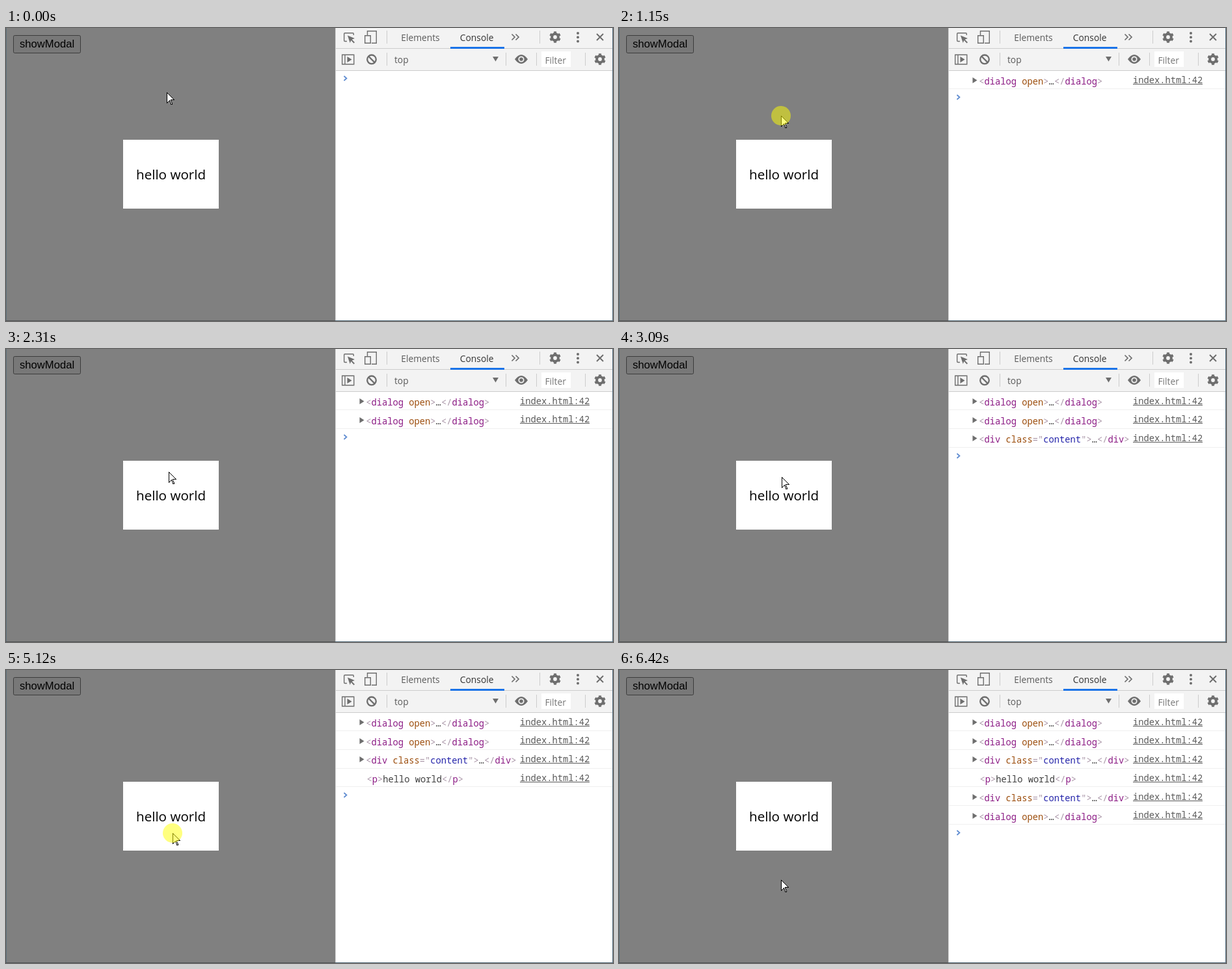
An HTML page that plays this animation: 933 by 451 pixels, repeating every 6.73 s.

```html
<!DOCTYPE html>
<html lang="en">
<head>
<meta charset="utf-8">
<title>Modal click log</title>
<style>
  html, body { margin: 0; width: 100%; height: 100%; overflow: hidden; background: #fff; }
  svg { display: block; }
  text { white-space: pre; }
  .ui { font: 13.8px "Open Sans", "Noto Sans", sans-serif; fill: #5a5a5a; }
  .code { font: 13.75px "Noto Sans Mono", "Liberation Mono", monospace; fill: #404040; }
  .mark { fill: #a894a6; }
  .tag { fill: #8b1a84; }
  .attr { fill: #9c4d0c; }
  .value { fill: #2424aa; }
  .link { fill: #5a5a5a; }
  .line { fill: none; stroke: #6e6e6e; stroke-width: 1.4; }
  .solid { fill: #6e6e6e; }
  .sep { stroke: #ccc; }
</style>
</head>
<body>
<svg width="933" height="451" viewBox="0 0 933 451">
  <defs>
    <g id="gear" fill="none" stroke="#6e6e6e">
      <circle r="4.9" stroke-width="4"/>
      <circle r="7.5" stroke-width="2.6" pathLength="12" stroke-dasharray="1 1" stroke-dashoffset="-.5"/>
    </g>
  </defs>

  <!-- page -->
  <rect width="506" height="451" fill="#808080"/>
  <rect x="11.5" y="11.5" width="103" height="27" rx="2" fill="#787878" stroke="#3b3b3b"/>
  <text x="63" y="30" text-anchor="middle" font-size="16.67" font-family="Liberation Sans, Arial, sans-serif">showModal</text>
  <rect x="180" y="172" width="147" height="106" fill="#fff"/>
  <text x="200" y="233" font-size="20.6" font-family="Open Sans, Noto Sans, sans-serif">hello world</text>

  <!-- developer tools -->
  <rect x="507" width="426" height="66" fill="#f3f3f3"/>
  <path d="M507 31.5H933M507 65.5H933" stroke="#ccc"/>
  <path d="M506.5 0V451" stroke="#cdcdcd"/>
  <rect x="683" y="29" width="83" height="3" fill="#1a73e8"/>
  <path class="sep" d="M585.5 4V24M820.5 4V24M585.5 38V58M768.5 38V58M815.5 38V58M890.5 38V58"/>

  <path class="line" d="M524 20.5H521Q519.7 20.5 519.7 19V9Q519.7 7.7 521 7.7H533Q534.3 7.7 534.3 9V11"/>
  <path class="solid" d="M525 11.5L536 16 531.7 17.7 536 22 534.6 23.4 530.3 19.1 528.8 23Z"/>
  <path class="line" d="M555.5 11V4.7H569.3V23.3H562M551.7 11.7H560.3V23.3H551.7Z"/>
  <path class="line" d="M777.5 9.5L782 14 777.5 18.5M783.5 9.5L788 14 783.5 18.5" style="stroke-width:1.7"/>
  <use href="#gear" x="844" y="14"/>
  <g class="solid"><circle cx="879" cy="8" r="2"/><circle cx="879" cy="14.3" r="2"/><circle cx="879" cy="20.5" r="2"/></g>
  <path class="line" d="M908 9L918 19M918 9L908 19" style="stroke-width:2"/>
  <path class="line" d="M516.7 41.2H534.8V55.8H516.7ZM521 41V56"/>
  <path class="solid" d="M524.5 44L531.5 48.5 524.5 53Z"/>
  <g class="line" style="stroke-width:2.3"><circle cx="562" cy="48.3" r="6.8"/><path d="M557.2 43.5L566.8 53.1"/></g>
  <path class="solid" d="M748 44H757L752.5 51.5Z"/>
  <path class="solid" d="M782 48Q792 34 802 48Q792 62 782 48Z"/>
  <circle cx="792" cy="48" r="3.7" fill="#6e6e6e" stroke="#f3f3f3" stroke-width="1.8"/>
  <rect x="823" y="36" width="45" height="24" fill="#fff"/>
  <use href="#gear" x="913" y="48"/>
  <g class="ui">
    <text x="607.3" y="20">Elements</text>
    <text x="697.8" y="20" style="fill:#333">Console</text>
    <text x="597" y="54">top</text>
    <text x="828.5" y="55" style="fill:#757575">Filter</text>
  </g>

  <g id="rows"></g>
  <path id="prompt" d="M519.5 74L523.5 77.5 519.5 81" fill="none" stroke="#5c8ad0" stroke-width="1.7"/>

  <!-- window edge -->
  <path d="M.5 0V451" stroke="#5d717c"/>
  <path d="M932.5 0V451" stroke="#557083"/>
  <path d="M0 450.5H506" stroke="#515456"/>
  <path d="M506 450.5H933" stroke="#536a78"/>

  <g id="pointer">
    <path id="arrow" d="M.5 .5V16.5L4.5 12.5 7 18.5H8.5V17L6.5 12.5V11.5H11.5Z" fill="#fff" stroke="#000" shape-rendering="crispEdges"/>
    <path id="beam" d="M-1 -6.5H1.5M3.5 -6.5H6M2.5 -6V8M-1 8.5H1.5M3.5 8.5H6" fill="none" stroke="#000"/>
    <circle id="press" r="15" fill="#ff0" fill-opacity=".5"/>
  </g>
</svg>

<script>
const LOOP = 6730;
const PITCH = 28.75;
const $ = id => document.getElementById(id);
const show = (node, on) => node.setAttribute('visibility', on ? 'visible' : 'hidden');

const mark = s => ['mark', s], tag = s => ['tag', s];
const dialog = [mark('<'), tag('dialog'), ['attr', ' open'], mark('>'), ['', '…'],
  mark('</'), tag('dialog'), mark('>')];
const content = [mark('<'), tag('div'), ['attr', ' class'], mark('="'), ['value', 'content'], mark('">'),
  ['', '…'], mark('</'), tag('div'), mark('>')];
const paragraph = [mark('<'), tag('p'), mark('>'), ['', 'hello world'], mark('</'), tag('p'), mark('>')];

const logs = [[230, dialog], [1300, dialog], [2710, content], [4020, paragraph], [5200, content], [6420, dialog]];
const presses = [[150, 230], [1150, 1230], [2630, 2710], [3950, 4020], [5120, 5200]];

// start, end, number of steps, destination, sideways bow
const home = [247, 99];
const moves = [
  [530, 920, 6, [249, 135], 0],
  [1850, 2160, 5, [249, 188], -2],
  [2310, 2310, 1, [250, 189], 0],
  [3090, 3400, 5, [251, 221], 0],
  [4340, 4570, 4, [256, 251], 0],
  [5580, 6040, 7, [249, 323], 0]
];

const escapeText = s => s.replace(/</g, '&lt;').replace(/>/g, '&gt;');

function rowMarkup([, parts], i) {
  const shift = Math.round(i * PITCH - 0.1);
  const line = 93.5 + Math.round(i * PITCH);
  const linkY = 85 + Math.floor(i * PITCH);
  const spans = parts.map(([kind, s]) => `<tspan class="${kind}">${escapeText(s)}</tspan>`).join('');
  const leaf = parts === paragraph;
  const toggle = leaf ? '' : `<path class="solid" d="M543.5 ${76 + shift}L550.5 ${80.5 + shift} 543.5 ${85 + shift}Z"/>`;
  return `<g class="code">${toggle}
    <text x="${leaf ? 554.5 : 553.3}" y="${87 + shift}">${spans}</text>
    <text class="link" x="790" y="${linkY}">index.html:42</text>
    <path d="M790 ${linkY + 1.5}H897" stroke="#5a5a5a"/>
    <path d="M507 ${line}H932" stroke="#f0f0f0"/></g>`;
}

$('rows').innerHTML = logs.map(rowMarkup).join('');
const rows = [...$('rows').children];

function pointerAt(t) {
  let from = home;
  for (const [start, end, steps, to, bow] of moves) {
    if (t < start) break;
    if (t >= end) { from = to; continue; }
    const k = Math.floor((t - start) / (end - start) * (steps - 1) + 1e-6) + 1;
    const u = 1 - (1 - k / steps) ** 1.25;
    return [
      Math.round(from[0] + (to[0] - from[0]) * u + bow * Math.sin(Math.PI * u)),
      Math.round(from[1] + (to[1] - from[1]) * u)
    ];
  }
  return from;
}

function draw(t) {
  const [x, y] = pointerAt(t);
  const overText = y >= 211 && y < 240;
  $('pointer').setAttribute('transform', `translate(${x} ${y})`);
  show($('arrow'), !overText);
  show($('beam'), overText);
  show($('press'), presses.some(([a, b]) => t >= a && t < b));
  rows.forEach((row, i) => show(row, t >= logs[i][0]));
  const count = logs.filter(([at]) => t >= at).length;
  $('prompt').setAttribute('transform', `translate(0 ${Math.ceil(count * PITCH)})`);
}

const origin = performance.now();
function tick() {
  draw((performance.now() - origin) % LOOP);
  requestAnimationFrame(tick);
}
tick();
</script>
</body>
</html>
```
